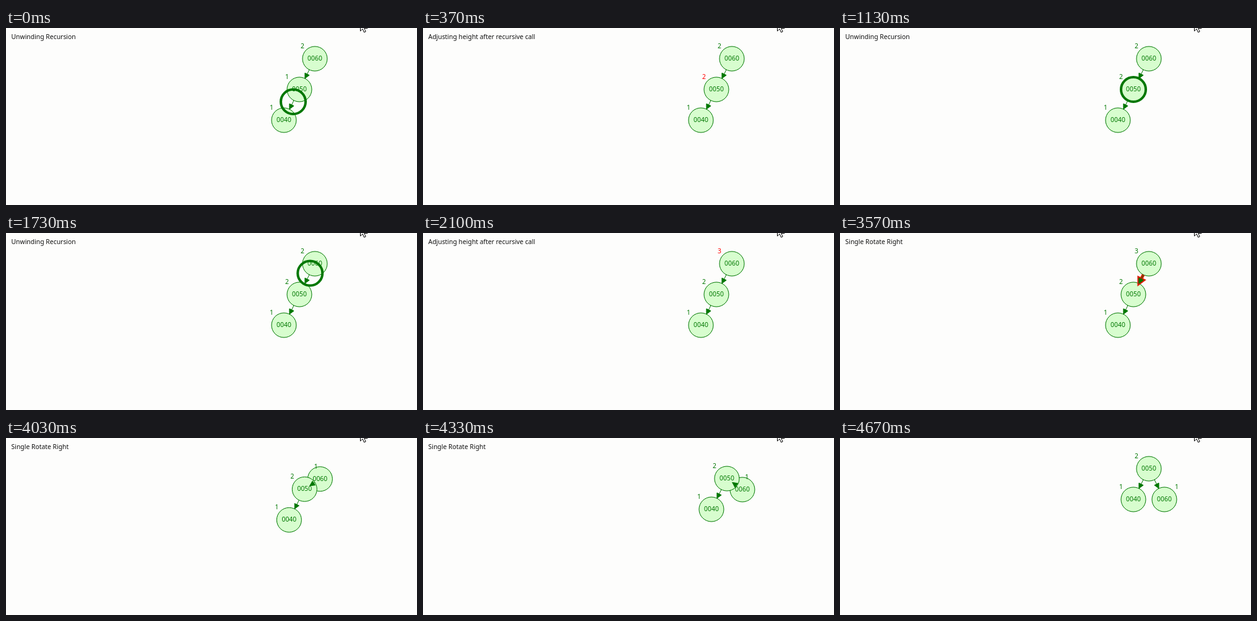
Write an HTML page that moves like this. It is 664 px wide and 288 px high and loops after 5200 ms.

```html
<!DOCTYPE html>
<html lang="en">
<head>
<meta charset="utf-8">
<title>AVL tree rotation</title>
<style>
  html, body { margin: 0; width: 100%; height: 100%; overflow: hidden; background: #fdfdfc; }
  svg { display: block; width: 664px; height: 288px; }
  text { font: 10.4px "Noto Sans", "Open Sans", sans-serif; fill: #070; }
  .mid { text-anchor: middle; }
  .node circle { fill: #d7fdce; stroke: #070; }
  .edge { fill: #070; stroke: #070; }
  .glow { fill: #dc1c00; stroke: #dc1c00; }
  .ring { fill: none; stroke: #070; stroke-width: 4; }
  .title { fill: #111; }
  .cursor { fill: #fff; stroke: #000; }
</style>
</head>
<body>
<svg viewBox="0 0 664 288"></svg>
<script>
const LOOP = 5200, STEP = 870, R = 20;
// Step boundaries in ms
const ADJUST_1 = 348, CLIMB = 1130, ADJUST_2 = 2000, MARK = 2870, ROTATE = 3740, DONE = 4610;

const svg = document.querySelector('svg');

function add(tag, attrs, parent = svg) {
  const el = document.createElementNS('http://www.w3.org/2000/svg', tag);
  set(el, attrs);
  parent.append(el);
  return el;
}

function set(el, attrs) {
  for (const key in attrs) el.setAttribute(key, attrs[key]);
}

const show = (el, on) => set(el, { visibility: on ? 'visible' : 'hidden' });
const lerp = (a, b, p) => a + (b - a) * p;
const mix = (a, b, p) => ({ x: lerp(a.x, b.x, p), y: lerp(a.y, b.y, p) });
const unit = p => Math.min(1, Math.max(0, p));

const title = add('text', { class: 'title', x: 8.5, y: 18 });

// Each node moves from one place to another; sideTo is the final x offset of its height label
function makeNode(value, from, to, sideTo = -R) {
  const g = add('g', { class: 'node' });
  add('circle', { r: R }, g);
  add('text', { class: 'mid', y: 3 }, g).textContent = value;
  return { g, from, to, sideTo, label: add('text', { class: 'mid' }) };
}

const root = { x: 499, y: 50 }, left = { x: 474, y: 100 };
const low = { x: 449, y: 150 }, right = { x: 524, y: 100 };

const n60 = makeNode('0060', root, right, R);
const n50 = makeNode('0050', left, root);
const n40 = makeNode('0040', low, left);

const ring = add('circle', { class: 'ring', r: R });
const glow = add('path', { class: 'glow' });
const edgeA = add('path', { class: 'edge' });
const edgeB = add('path', { class: 'edge' });

add('path', {
  class: 'cursor',
  transform: 'translate(572.5 -11.5)',
  d: 'M0 0V16.5L3.7 13L6 18.5L8.6 17.5L6.3 12H11.5Z'
});

// Line between two circle rims, with a filled head at the far end
function arrow(a, b) {
  const len = Math.hypot(b.x - a.x, b.y - a.y);
  const dx = (b.x - a.x) / len, dy = (b.y - a.y) / len;
  const x1 = a.x + dx * R, y1 = a.y + dy * R;
  const x2 = b.x - dx * R, y2 = b.y - dy * R;
  // Overlapping circles turn the line around
  const sign = len < 2 * R ? -1 : 1;
  const ux = dx * sign, uy = dy * sign;
  const bx = x2 - ux * 8, by = y2 - uy * 8;
  return `M${x1} ${y1}L${x2} ${y2}` +
    `M${x2} ${y2}L${bx - uy * 4} ${by + ux * 4}L${bx + uy * 4} ${by - ux * 4}Z`;
}

function place(node, p, height, hot) {
  const at = mix(node.from, node.to, p);
  set(node.g, { transform: `translate(${at.x} ${at.y})` });
  set(node.label, { x: at.x + lerp(-R, node.sideTo, p), y: at.y - R + 3 });
  node.label.textContent = height;
  node.label.style.fill = hot ? '#f00' : '';
  return at;
}

function caption(t) {
  if (t >= DONE) return '';
  if (t >= MARK) return 'Single Rotate Right';
  const adjusting = t >= ADJUST_1 && t < CLIMB || t >= ADJUST_2;
  return adjusting ? 'Adjusting height after recursive call' : 'Unwinding Recursion';
}

// Highlight width swings between 3 and 5
function pulse(t) {
  const phase = ((t - MARK) / 490 + 0.5) % 4;
  return 5 - Math.abs(phase - 2);
}

function draw(t) {
  title.textContent = caption(t);

  const p = unit((t - ROTATE) / STEP);
  const rotated = t >= ROTATE;
  const h60 = rotated ? 1 : t >= ADJUST_2 ? 3 : 2;
  const a = place(n60, p, h60, t >= ADJUST_2 && t < MARK);
  const b = place(n50, p, t >= ADJUST_1 ? 2 : 1, t >= ADJUST_1 && t < CLIMB);
  const c = place(n40, p, 1, false);

  const upper = rotated ? arrow(b, a) : arrow(a, b);
  set(edgeA, { d: upper });
  set(edgeB, { d: arrow(b, c) });
  set(glow, { d: upper, 'stroke-width': pulse(Math.max(t, MARK)) });
  show(glow, t >= MARK && t < ROTATE);

  const climbing = t >= CLIMB;
  const spot = climbing
    ? mix(left, root, unit((t - CLIMB) / STEP))
    : mix(low, left, unit(0.6 + t / STEP));
  set(ring, { cx: spot.x, cy: spot.y });
  show(ring, climbing ? t < ADJUST_2 : t < ADJUST_1);
}

const start = performance.now();
function tick() {
  draw((performance.now() - start) % LOOP);
  requestAnimationFrame(tick);
}
draw(0);
requestAnimationFrame(tick);
</script>
</body>
</html>
```
